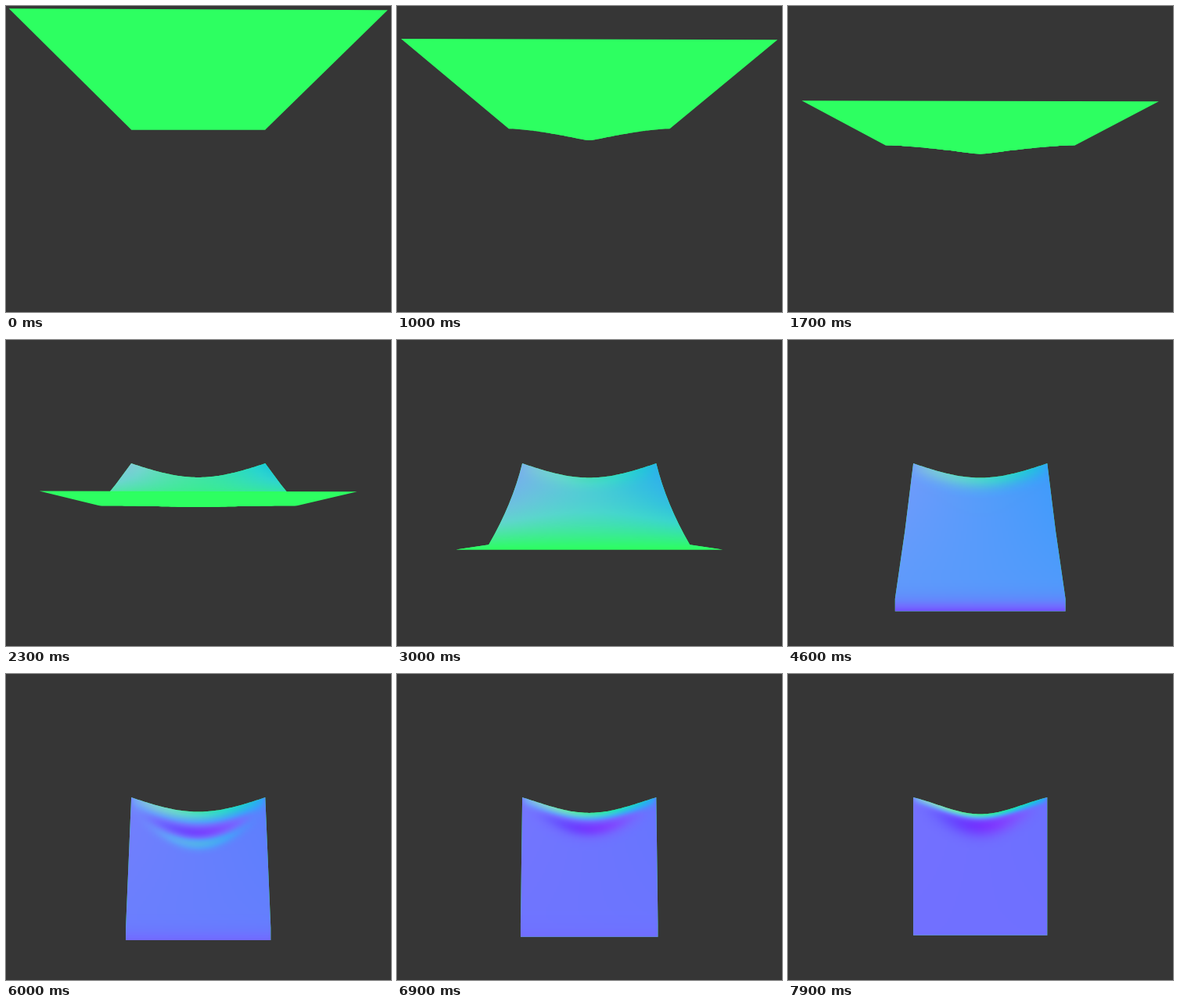
An HTML page with a canvas for the animation above (8 s loop, 492 by 392 pixels).

```html
<!DOCTYPE html>
<html lang="en">
<head>
<meta charset="utf-8">
<title>Falling cloth</title>
<style>
html, body { margin: 0; width: 100%; height: 100%; overflow: hidden; background: #363636; }
canvas { display: block; }
</style>
</head>
<body>
<canvas id="stage" width="492" height="392"></canvas>
<script>
const W = 492, H = 392, LOOP = 8000;
const CX = 245.7, PIN_Y = 158, PIN_HALF = 85.6;
const HORIZON = 243.5, FOCAL = 264.9, CAMERA_DROP = 0.993;
const GREEN = '#2dff61';
const ctx = document.getElementById('stage').getContext('2d');

// Shading is computed at half size and scaled up smoothly.
const shade = document.createElement('canvas');
shade.width = W / 2;
shade.height = H / 2;
const sctx = shade.getContext('2d');
const img = sctx.createImageData(shade.width, shade.height);

// Swing of the free edge about the pins: time, angle.
const SWING = [
  [200, 0], [1100, 0.093], [1700, 0.232], [2000, 0.299], [3000, 0.637],
  [3900, 0.979], [4600, 1.243], [6000, 1.457], [7900, Math.PI / 2]
];

// Colour by tilt, from lying flat to leaning past vertical.
const RAMP = [
  [0, 45, 255, 96], [0.5, 77, 214, 205], [1, 84, 160, 250],
  [1.3, 112, 112, 255], [1.8, 118, 52, 255]
];

const clamp = (v, a, b) => Math.min(b, Math.max(a, v));
const mix = (a, b, f) => a + (b - a) * f;
const bell = (d, w) => Math.exp(-(d / w) * (d / w));

function ease(t, from, to) {
  const f = clamp((t - from) / (to - from), 0, 1);
  return f * f * (3 - 2 * f);
}

function segment(rows, x) {
  let i = 0;
  while (i < rows.length - 2 && x > rows[i + 1][0]) i++;
  return i;
}

// Cubic curve through key points, at rest at both ends.
function curve(keys, t) {
  const last = keys.length - 1;
  t = clamp(t, keys[0][0], keys[last][0]);
  const slope = j => j === 0 || j === last ? 0
    : (keys[j + 1][1] - keys[j - 1][1]) / (keys[j + 1][0] - keys[j - 1][0]);
  const i = segment(keys, t), [t0, a] = keys[i], [t1, b] = keys[i + 1];
  const span = t1 - t0, f = (t - t0) / span, g = 1 - f;
  return mix(a, b, f * f * (3 - 2 * f))
    + span * f * g * (slope(i) * g - slope(i + 1) * f);
}

function ramp(q) {
  q = clamp(q, 0, 1.8);
  const i = segment(RAMP, q), a = RAMP[i], b = RAMP[i + 1];
  const f = (q - a[0]) / (b[0] - a[0]);
  return [1, 2, 3].map(c => mix(a[c], b[c], f));
}

// The free edge is a pendulum seen in perspective; a fold runs out from the pins.
function pose(t) {
  const angle = curve(SWING, t);
  const length = 2 + 0.058 * ease(t, 3500, 4600) - 0.09 * bell(t - 2800, 800);
  const fw = FOCAL / (FOCAL / PIN_HALF - length * Math.cos(angle));
  const fy = HORIZON + fw * (length * Math.sin(angle) - CAMERA_DROP);
  const spread = 1 - bell(Math.max(0, t - 200), 1115);
  const hw = Math.min(fw, PIN_HALF + 43 * spread);
  return {
    t, angle, fw, fy, hw,
    hy: HORIZON + (fy - HORIZON) * hw / fw - 16 * ease(t, 3900, 4600),
    belly: 18 * bell(t - 1250, 720) * ease(t, 200, 900),
    sag: 18.5 * spread + 3 * ease(t, 6000, 7900),
    bulge: 11.5 * bell(t - 3450, 850),
    round: mix(0.2, 0.5, ease(t, 6200, 7900)),
    skew: clamp(2 - t / 1700, 0, 2)
  };
}

function topY(p, u) {
  const s = Math.sin(Math.PI * u);
  return PIN_Y + p.sag * mix(4 * u * (1 - u), s * s, p.round);
}

function bellyY(p, u) {
  const d = 2 * u - 1;
  return p.hy + p.belly * Math.pow(Math.max(0, 1 - Math.sqrt(d * d + 0.003)), 1.5);
}

function edge(path, half, yAt, from, to) {
  for (let i = 0; i <= 60; i++) {
    const u = mix(from, to, i / 60);
    path.lineTo(CX + half * (2 * u - 1), yAt(u));
  }
}

function side(path, p, sign, down) {
  const mx = CX + sign * ((PIN_HALF + p.hw) / 2 - p.bulge);
  const my = (PIN_Y + p.hy) / 2;
  const x = CX + sign * (down ? p.hw : PIN_HALF);
  path.quadraticCurveTo(mx, my, x, down ? p.hy : PIN_Y);
}

function panelPath(p, withFlap) {
  const path = new Path2D();
  edge(path, PIN_HALF, u => topY(p, u), 0, 1);
  side(path, p, 1, true);
  if (withFlap) {
    path.lineTo(CX + p.fw, p.fy);
    path.lineTo(CX - p.fw, p.fy);
    path.lineTo(CX - p.hw, p.hy);
  } else {
    edge(path, p.hw, u => bellyY(p, u), 1, 0);
  }
  side(path, p, -1, false);
  path.closePath();
  return path;
}

function flapPath(p) {
  const path = new Path2D();
  path.moveTo(CX - p.fw, p.fy);
  path.lineTo(CX + p.fw, p.fy + p.skew);
  edge(path, p.hw, u => bellyY(p, u), 1, 0);
  path.closePath();
  return path;
}

function paintShade(p) {
  const t = p.t;
  const top = 0.827 * p.angle + 0.13 * bell(p.angle - 0.6, 0.35);
  const slack = 0.4 * (1 - ease(t, 3900, 4600));
  const settle = Math.exp(-Math.max(0, t - 4600) / 900);
  const end = ease(t, 3900, 4500) * (1.3 + 0.28 * settle);
  const power = mix(5, 18, ease(t, 3000, 3900));
  const tighten = ease(t, 5200, 8000);
  const rim = Math.max(0, (t - 2000) / 5000);
  const rimWidth = mix(14, 6, tighten);
  const fold = 0.5 * ease(t, 4700, 6000);
  const foldAt = mix(27, 15, ease(t, 5800, 7900));
  const foldWidth = mix(8, 14, tighten);
  const echo = 0.4 * bell(t - 6000, 700);
  const bottom = Math.max(p.fy, p.hy + p.belly);
  const across = (x, half) => clamp((x - CX) / half / 2 + 0.5, 0, 1);

  for (let j = 74; j < 180; j++) {
    const y = j * 2 + 1;
    const k = clamp((y - PIN_Y) / (bottom - PIN_Y), 0, 1);
    const hang = mix(top - slack * k * k, end, Math.pow(k, power));
    const half = mix(PIN_HALF, p.hw, k);
    for (let i = 26; i < 220; i++) {
      const x = i * 2 + 1;
      const u = across(x, half), s = Math.sin(Math.PI * u);
      const d = y - topY(p, across(x, PIN_HALF));
      const at = foldAt * (0.5 + 0.5 * s);
      const base = hang + 0.5 * slack * (2 * u - 1) ** 2 * (1 - k * k);
      const crease = -rim * Math.sqrt(s) * bell(Math.max(0, d), rimWidth)
        + s * s * (fold * bell(d - at, foldWidth) - echo * bell(d - at * 1.5, 8));
      const lean = 150 * Math.max(0, 1.36 - base) * Math.min(1, 1.5 * base) * (1 - 0.85 * k);
      const [r, g, b] = ramp(base + crease);
      img.data.set([r + (0.5 - u) * (lean - 200 * crease), g, b, 255], (j * shade.width + i) * 4);
    }
  }
  sctx.putImageData(img, 0, 0);
}

function fillShaded(path) {
  ctx.fillStyle = GREEN;
  ctx.fill(path);
  ctx.save();
  ctx.clip(path);
  ctx.drawImage(shade, 0, 0, W, H);
  ctx.restore();
}

function draw(t) {
  const p = pose(t);
  const hanging = p.fy > p.hy;
  ctx.fillStyle = '#363636';
  ctx.fillRect(0, 0, W, H);
  if (t < 1700) {
    ctx.fillStyle = GREEN;
    ctx.fill(panelPath(p, false));
  } else {
    paintShade(p);
    fillShaded(panelPath(p, hanging));
  }
  if (!hanging) {
    ctx.fillStyle = GREEN;
    ctx.fill(flapPath(p));
  }
}

let shown = -1;
const start = performance.now();

function tick() {
  const t = (performance.now() - start) % LOOP;
  const step = t < 300 ? 0 : Math.floor(t / 100) * 100;
  if (step !== shown) {
    shown = step;
    draw(step);
  }
  requestAnimationFrame(tick);
}
tick();
</script>
</body>
</html>
```
